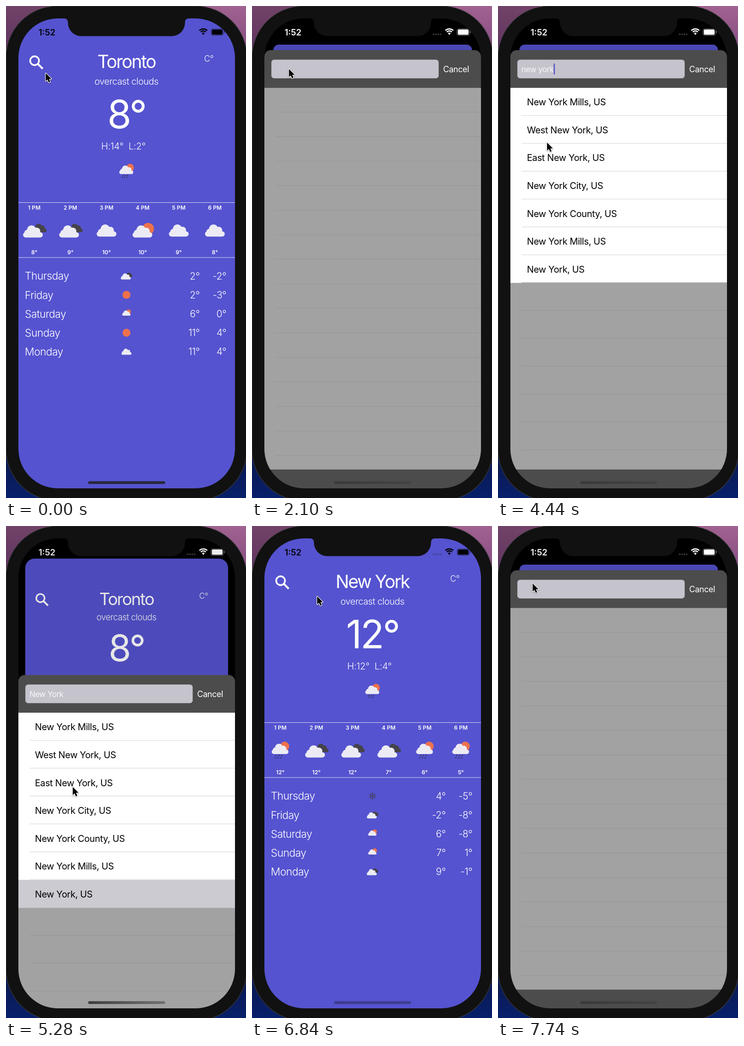
Recreate the animation shown at these times as an HTML page with a canvas. Size 523 by 1070 pixels, loop 8000 ms.

```html
<!DOCTYPE html>
<html lang="en">
<head>
<meta charset="utf-8">
<title>Weather app</title>
<style>
html, body { margin: 0; width: 100%; height: 100%; overflow: hidden; background: #111; }
canvas { display: block; }
</style>
</head>
<body>
<canvas id="stage" width="523" height="1070"></canvas>
<script>
const g = document.getElementById('stage').getContext('2d');
const LOOP = 8000;
const PURPLE = '#5553cf', GREY = '#4c4c4c';
const LEFT = 27, TOP = 27, W = 472, H = 1022, MID = 262.5;
const SHEET_TOP = 96, ROW = 60.6;

const clamp = x => Math.max(0, Math.min(1, x));
const ramp = (t, a, b) => clamp((t - a) / (b - a));
const mix = (a, b, k) => a + (b - a) * k;
const smooth = k => k * k * (3 - 2 * k);

// Critically damped spring from 0 to 1
const spring = ms => {
  if (ms <= 0) return 0;
  const x = ms * 0.0153;
  return 1 - (1 + x) * Math.exp(-x);
};

const OPEN = 240, PICK = 5040, CLOSE = 5221, LOADED = 5760, REOPEN = 7060;

const toronto = {
  city: 'Toronto', temp: '8°', range: 'H:14°  L:2°',
  hours: ['broken', 'broken', 'cloud', 'partly', 'cloud', 'cloud'],
  temps: [8, 9, 10, 10, 9, 8],
  days: ['broken', 'sun', 'rain', 'sun', 'cloud'],
  highs: [2, 2, 6, 11, 11], lows: [-2, -3, 0, 4, 4]
};
const newYork = {
  city: 'New York', temp: '12°', range: 'H:12°  L:4°',
  hours: ['rain', 'broken', 'broken', 'broken', 'rain', 'rain'],
  temps: [12, 12, 12, 7, 6, 5],
  days: ['snow', 'broken', 'rain', 'rain', 'broken'],
  highs: [4, -2, 6, 7, 9], lows: [-5, -8, -8, 1, -1]
};
const dayNames = ['Thursday', 'Friday', 'Saturday', 'Sunday', 'Monday'];
const results = ['New Yekepa, LR', 'New York Mills, US', 'West New York, US', 'East New York, US',
  'New York City, US', 'New York County, US', 'New York Mills, US', 'New York, US'];
const keyTimes = [2340, 2520, 2700, 3000, 3180, 3420, 3600, 3840];

// time, x, y of the pointer tip
const pointerPath = [
  [0, 86.5, 146], [200, 72, 127], [300, 72, 127], [480, 78.5, 133], [1860, 78.5, 133], [2060, 80.5, 137],
  [4080, 80.5, 137], [4860, 140, 497], [5000, 145.5, 567.5], [5640, 145.5, 567.5],
  [6400, 142, 153], [6840, 142, 153], [7000, 72, 125], [7300, 72, 125], [7500, 75.5, 125]
];

function font(size, weight = 400, track = -0.025) {
  g.font = `${weight} ${size}px Inter, "Open Sans", sans-serif`;
  g.letterSpacing = size * track + 'px';
}
function text(str, x, y, size, { weight, track, align = 'left', color = '#fff' } = {}) {
  font(size, weight, track);
  g.textAlign = align;
  g.fillStyle = color;
  g.fillText(str, x, y + size * 0.364);   // y is the middle of the capitals
}
function box(x, y, w, h, color) {
  g.fillStyle = color;
  g.fillRect(x, y, w, h);
}
function round(x, y, w, h, r, color) {
  g.beginPath();
  g.roundRect(x, y, w, h, r);
  g.fillStyle = color;
  g.fill();
}
function disc(x, y, r, color) {
  g.beginPath();
  g.arc(x, y, r, 0, 7);
  g.fillStyle = color;
  g.fill();
}

function cloud(x, y, k, color) {
  g.save();
  g.translate(x, y);
  g.scale(k, k);
  disc(-3, -3, 10, color);
  disc(8, 0, 8, color);
  disc(-12, 3, 6.5, color);
  round(-21.5, 2, 43, 11.5, 5.7, color);
  g.restore();
}
const icons = {
  cloud() { cloud(0, 0, 1, '#ecebf4'); },
  sun() { disc(0, 0, 17.3, '#ee714d'); },
  broken() {
    cloud(11.5, -5.5, 0.7, '#45434a');
    cloud(-3, 2, 1, '#ecebf4');
  },
  partly() {
    disc(12, -3.5, 12.8, '#ee714d');
    cloud(-0.5, 2, 1, '#ecebf4');
  },
  rain() {
    disc(9.5, -9, 10, '#ee714d');
    cloud(-0.5, -3.5, 0.85, '#ecebf4');
    for (let i = 0; i < 6; i++) disc(-9 + i % 3 * 6 - (i > 2 ? 2 : 0), i > 2 ? 16 : 11, 1.5, '#38365f');
  },
  snow() {
    g.strokeStyle = '#414062';
    g.lineWidth = 2.4;
    for (let i = 0; i < 6; i++) {
      g.save();
      g.rotate(i * Math.PI / 3);
      g.beginPath();
      g.moveTo(0, 0); g.lineTo(0, -14);
      g.moveTo(-5, -13); g.lineTo(0, -8); g.lineTo(5, -13);
      g.stroke();
      g.restore();
    }
  }
};
function icon(name, x, y, k) {
  g.save();
  g.translate(x, y);
  g.scale(k, k);
  icons[name]();
  g.restore();
}

function weather(d) {
  const light = { weight: 350 }, center = { weight: 350, align: 'center' };
  g.strokeStyle = '#fff';
  g.lineWidth = 3.6;
  g.beginPath();
  g.arc(62.3, 119, 9.6, 0, 7);
  g.stroke();
  g.lineWidth = 4;
  g.beginPath();
  g.moveTo(69.5, 126); g.lineTo(80, 136.5);
  g.stroke();

  text(d.city, MID, 121, 39, { align: 'center', track: -0.055 });
  text('C°', 442, 114, 18, center);
  text('overcast clouds', MID, 163.5, 20, center);
  text(d.temp, MID, 235, 85, { align: 'center', track: -0.04 });
  text(d.range, 256, 305, 20, { ...center, track: -0.01 });
  icon('rain', MID, 359, 0.83);

  box(LEFT, 427, W, 1, '#dcdcf5');
  box(LEFT, 546.5, W, 1, '#dcdcf5');
  d.hours.forEach((name, i) => {
    const x = 61.7 + 78.7 * i, small = { weight: 600, align: 'center', track: 0.01 };
    text(i + 1 + ' PM', x, 439, 12, small);
    icon(name, x, 488, 1);
    text(d.temps[i] + '°', x, 536, 12, small);
  });
  d.days.forEach((name, i) => {
    const y = 587 + 41.2 * i, right = { weight: 350, align: 'right' };
    text(dayNames[i], 41, y, 23, light);
    icon(name, MID, y, 0.5);
    text(d.highs[i] + '°', 422, y, 21, right);
    text(d.lows[i] + '°', 480, y, 21, right);
  });
}

// The weather page, shrinking to a dimmed card as the sheet rises
function card(p, d) {
  const k = 1 - 0.083 * p;
  g.save();
  g.translate(MID, mix(TOP, 84, p));
  g.scale(k, k);
  g.translate(-MID, -TOP);
  g.beginPath();
  g.roundRect(LEFT, TOP, W, H, p > 0 ? mix(52, 13, p) : 0);
  g.clip();
  box(LEFT, TOP, W, H, PURPLE);
  weather(d);
  box(LEFT, TOP, W, H, `rgba(0,0,0,${0.13 * p})`);
  g.restore();
}

function caretAlpha(t) {
  if (t < 2340) return t >= 930 && t < 1500 ? 1 : ramp(t, 1780, 1860) * (1 - ramp(t, 2040, 2100));
  if (t > PICK) return 0;
  return t < 4080 || t % 1000 < 550 ? 1 : 0;
}

function sheet(p, t) {
  const first = t < REOPEN;
  const count = first ? keyTimes.filter(k => t >= k).length : 0;
  const query = t >= PICK && first ? 'New York' : 'new york'.slice(0, count);
  const rows = count < 5 ? [] : results.slice(count > 5 ? 1 : 0);
  const step = rows.length ? ROW : 53.33;

  g.save();
  g.translate(0, SHEET_TOP + (1 - p) * 974);
  round(LEFT, 0, W, 1000, [14, 14, 0, 0], GREY);
  round(42, 20.5, 365, 41, 6, '#8f8f96');
  round(42.5, 21, 364, 40, 6, '#c5c4cd');
  text('Cancel', 416.5, 41.5, 18);
  text(query, 51, 41.5, 17, { color: '#f7f7fa' });
  const caret = first ? caretAlpha(t) : 0;
  if (caret) {
    const x = 51 + g.measureText(query).width;
    g.globalAlpha = caret;
    round(x, 29, 2.5, 24, 1, '#4f4fc8');
    g.globalAlpha = 1;
  }

  box(LEFT, 82, W, 830, '#a2a2a2');
  box(LEFT, 82, W, rows.length * ROW, '#fff');
  for (let i = 1; 82 + i * step < 912; i++)
    box(51.5, 81 + i * step, 447.5, 1, i < rows.length ? '#d2d2d4' : '#959595');
  rows.forEach((name, i) => {
    const y = 82 + i * ROW;
    if (t >= PICK && i === rows.length - 1) box(LEFT, y, W, ROW, '#cccbd2');
    text(name, 63, y + 31, 20, { color: '#000', track: -0.02 });
  });
  g.restore();
}

function statusBar(level, t) {
  const v = Math.round(255 * level), color = `rgb(${v},${v},${v})`;
  text('1:52', 71, 57, 18.5, { weight: 600, track: 0, color });
  if (t > 60) for (let i = 0; i < 4; i++)
    disc(396 + i * 5, 61.5, 1.9, level > 0.3 ? '#343434' : '#4442a0');

  g.strokeStyle = color;
  g.lineWidth = 2.7;
  for (const r of [12.2, 7.8]) {
    g.beginPath();
    g.arc(430, 62, r, -Math.PI * 0.75, -Math.PI * 0.25);
    g.stroke();
  }
  g.beginPath();
  g.moveTo(430, 63.2);
  g.arc(430, 62, 4.2, -Math.PI * 0.75, -Math.PI * 0.25);
  g.fillStyle = color;
  g.fill();

  round(448.5, 51, 23.5, 11.5, 2.5, color);
  g.globalAlpha = 0.45;
  g.lineWidth = 1;
  g.beginPath();
  g.roundRect(446.5, 49.5, 27.5, 14.5, 4);
  g.stroke();
  round(475, 54.5, 1.6, 4.5, 1, color);
  g.globalAlpha = 1;
}

function homeBar(p, t) {
  const fill = g.createLinearGradient(179, 0, 347, 0);
  const moving = p > 0.02 && p < 0.975;
  const ends = moving ? ['#3c3c3c', '#707070'] : p > 0.5 ? ['#3a3a3a', '#444444']
    : t < 300 ? ['#29283a', '#29283a'] : ['#3d3b8c', '#403e92'];
  ends.forEach((c, i) => fill.addColorStop(i, c));
  round(179, 1033.5, 168, 6, 3, fill);
}

function body() {
  const sky = g.createLinearGradient(0, 0, 0, 1070);
  [[0, '#a0628f'], [0.08, '#8a4f85'], [0.5, '#3a2b66'], [0.94, '#0a1a55'], [1, '#081f6b']]
    .forEach(([k, c]) => sky.addColorStop(k, c));
  box(0, 0, 523, 1070, sky);
  box(0, 0, 90, 90, 'rgba(20,5,25,.33)');
  round(-0.5, -0.5, 526, 1077, 112, '#39393d');
  round(0.7, 0.7, 523.6, 1074.6, 111, '#111');
}

function notch() {
  g.beginPath();
  g.moveTo(126, 26);
  g.lineTo(126, 27);
  g.quadraticCurveTo(135, 27, 135, 36);
  g.arcTo(135, 65.5, 165, 65.5, 29);
  g.arcTo(390, 65.5, 390, 36, 29);
  g.lineTo(390, 36);
  g.quadraticCurveTo(390, 27, 399, 27);
  g.lineTo(399, 26);
  g.fillStyle = '#111';
  g.fill();
}

function pointer(t) {
  let i = pointerPath.findIndex(k => k[0] > t);
  if (i < 0) i = pointerPath.length;
  const a = pointerPath[i - 1], b = pointerPath[i] || a;
  const k = a === b ? 0 : smooth(ramp(t, a[0], b[0]));
  g.save();
  g.translate(mix(a[1], b[1], k), mix(a[2], b[2], k));
  g.beginPath();
  [[0, 0], [0, 17.5], [4, 14], [6.8, 20.4], [9.8, 19.1], [7.2, 12.8], [12.5, 12.6]]
    .forEach(q => g.lineTo(...q));
  g.closePath();
  g.shadowColor = 'rgba(0,0,0,.35)';
  g.shadowBlur = 3;
  g.shadowOffsetY = 1;
  g.lineJoin = 'round';
  g.lineWidth = 2.4;
  g.strokeStyle = '#fff';
  g.stroke();
  g.shadowColor = 'transparent';
  g.fillStyle = '#000';
  g.fill();
  g.restore();
}

function draw(t) {
  const p = t < CLOSE ? spring(t - OPEN) : t < REOPEN ? 1 - spring(t - CLOSE) : spring(t - REOPEN);
  const shown = p > 0.002 ? p : 0;
  const level = t < CLOSE ? ramp(t, 350, 645) : t < REOPEN ? 1 - ramp(t, 5260, 5560)
    : ramp(t, REOPEN + 110, REOPEN + 405);

  body();
  g.save();
  g.beginPath();
  g.roundRect(LEFT, TOP, W, H, 86);
  g.clip();
  box(LEFT, TOP, W, H, '#000');
  card(shown, t < LOADED ? toronto : newYork);
  if (shown) sheet(p, t);
  statusBar(level, t);
  homeBar(p, t);
  g.restore();
  notch();
  pointer(t);
}

const start = performance.now();
function tick() {
  draw((performance.now() - start) % LOOP);
  requestAnimationFrame(tick);
}
tick();
</script>
</body>
</html>
```
